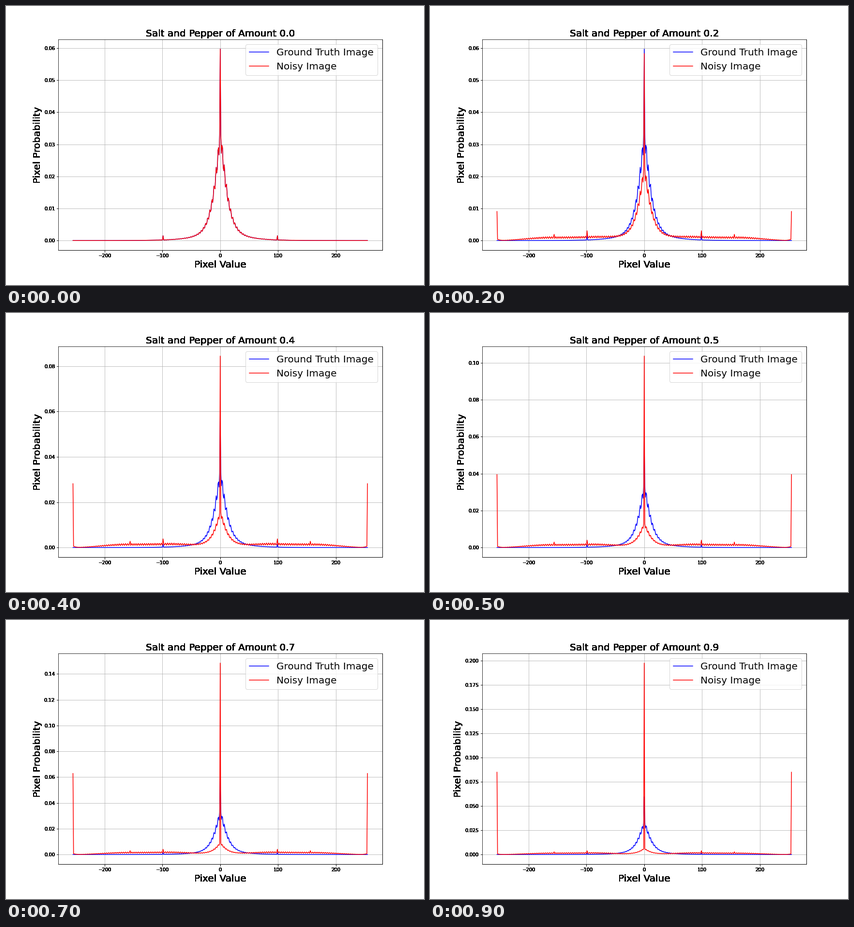
Write a matplotlib script that moves like this. It is 864 by 576 pixels and loops after 1000 ms.

```python
import numpy as np
import matplotlib.pyplot as plt
from matplotlib.animation import FuncAnimation

FRAMES = 10
LAYERS = 20  # stacked axes darken the text around the plot
PERIOD = 255 / 70
STRAY = 99  # one grey level that is over-represented
diff = np.arange(-255, 256)
size = np.abs(diff)
level = np.arange(256)


def ripple(x, depth):
    return 1 - depth * (1 - np.cos(2 * np.pi * x / PERIOD)) / 2


def difference_curve():
    core = .0295 * np.exp(-.0415 * size ** 1.25)
    tail = .0065 * np.exp(-size / 29)
    spike = .0237 * np.exp(-2.2 * size)
    skew = 1 + .017 * np.tanh(diff / 3)
    curve = (core + tail + spike) * ripple(size, .19) * skew
    curve[size == STRAY] += .0013
    return curve


def level_histogram(mode=88, height=.0117):
    t = np.clip(level / mode, 0, 1)
    rise = t * t * (3 - 2 * t)
    fall = np.clip((255 - level) / (255 - mode), 0, 1) ** 1.3
    hist = height * rise * fall * ripple(level, .5)
    hist += .0035 * (np.exp(-level / 4) + np.exp((level - 255) / 4))
    hist[0] += .005
    hist[STRAY] += .0125
    return hist


truth = difference_curve()
levels = level_histogram()


def noisy_curve(amount):
    """Differences of neighbours after salt, then pepper, hit random pixels."""
    spared = np.exp(-amount / 2)
    keep, pepper, salt = spared ** 2, 1 - spared, spared * (1 - spared)
    curve = keep ** 2 * truth
    curve += keep * (pepper * levels[size] + salt * levels[255 - size])
    curve[[0, -1]] += salt * pepper
    # Both neighbours alike: either one may be the pixel that was hit
    curve[255] += pepper ** 2 + salt ** 2
    curve[255] += keep * (pepper * levels[0] + salt * levels[255])
    return curve


fig = plt.figure(figsize=(12, 8), dpi=72, facecolor="white")
layers = [fig.add_axes([.125, .125, .775, .755], label=str(n)) for n in range(LAYERS)]
for ax in layers:
    ax.set_xlim(-280.5, 280.5)
    ax.set_xlabel("Pixel Value", fontsize=20)
    ax.set_ylabel("Pixel Probability", fontsize=20)

top = layers[-1]
top.grid(True)
top.plot(diff, truth, color="blue", label="Ground Truth Image")
noisy_line, = top.plot(diff, truth, color="red", label="Noisy Image")
top.legend(loc="upper right", fontsize=20)


def update(i):
    amount = i / FRAMES
    noisy = noisy_curve(amount)
    noisy_line.set_ydata(noisy)
    peak = max(truth.max(), noisy.max())
    for ax in layers:
        ax.set_ylim(-.05 * peak, 1.05 * peak)
        ax.set_title(f"Salt and Pepper of Amount {amount:.1f}", fontsize=20)
    return [noisy_line]


anim = FuncAnimation(fig, update, frames=FRAMES, interval=100, repeat=True,
                     repeat_delay=0, blit=False)
plt.show()
```
